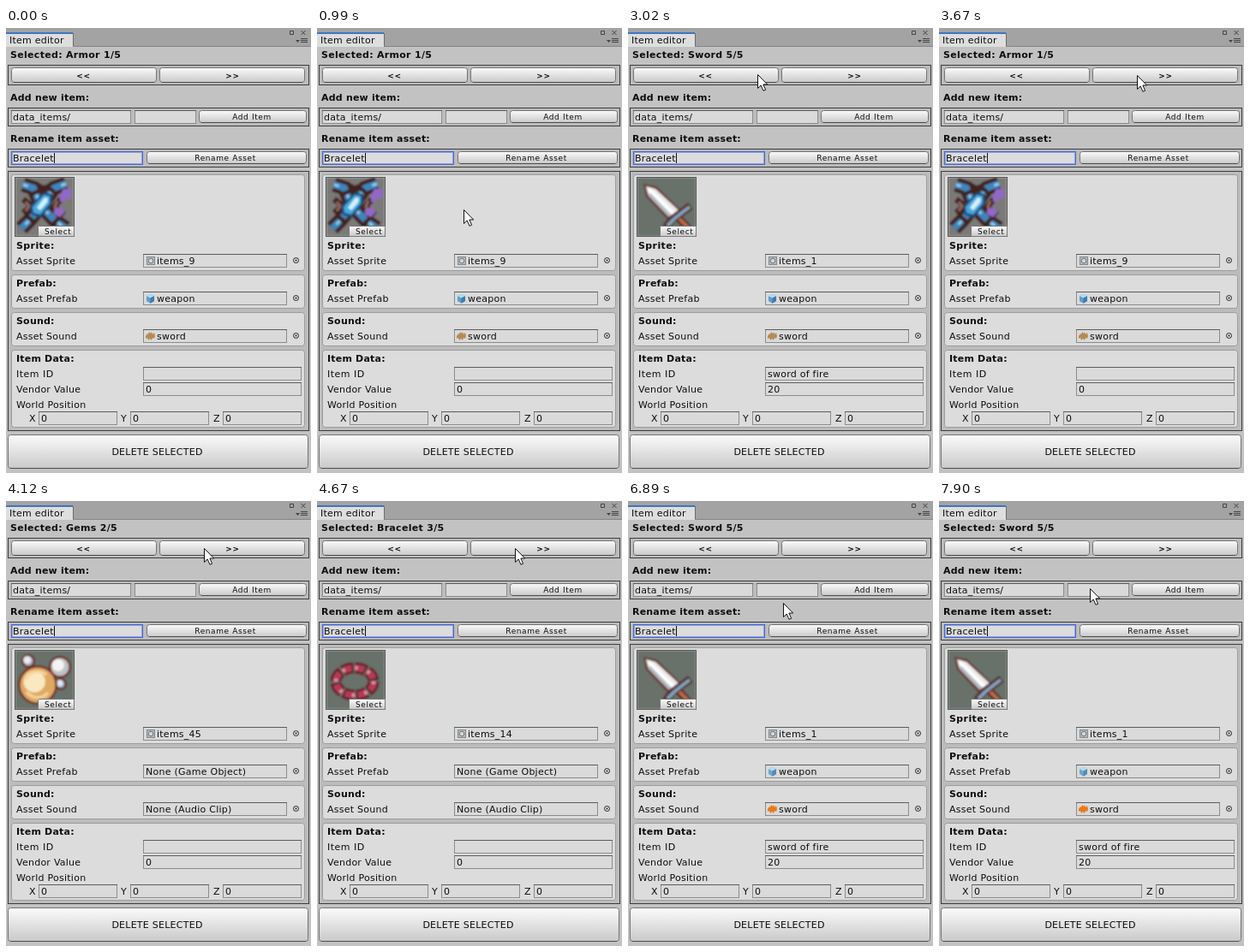
An HTML page that plays this animation: 356x520 px, repeating every 8000 ms.

```html
<!DOCTYPE html>
<html lang="en">
<head>
<meta charset="utf-8">
<title>Item editor</title>
<style>
html, body { margin: 0; width: 100%; height: 100%; overflow: hidden; background: #c2c2c2; }
svg { display: block; width: 100%; height: 100%; }
text { font: 11px "DejaVu Sans", Verdana, sans-serif; fill: #0c0c0c; white-space: pre; }
.b { font-weight: bold; }
.s { font-size: 9px; }
.m { text-anchor: middle; }
</style>
</head>
<body>
<svg id="stage" viewBox="0 0 356 520"></svg>
<script>
const LOOP = 8000;

const items = [
  { name: "Armor 1/5", sprite: "items_9", prefab: "weapon", sound: "sword", id: "", value: "0" },
  { name: "Gems 2/5", sprite: "items_45", prefab: "", sound: "", id: "", value: "0" },
  { name: "Bracelet 3/5", sprite: "items_14", prefab: "", sound: "", id: "", value: "0" },
  { name: "Jar 4/5", sprite: "items_4", prefab: "food", sound: "food", id: "jar of jelly", value: "5" },
  { name: "Sword 5/5", sprite: "items_1", prefab: "weapon", sound: "sword", id: "sword of fire", value: "20" }
];

// time of press, time of release, button, item shown after release
const clicks = [
  [2230, 2340, "prev", 4], [3570, 3670, "next", 0], [4020, 4120, "next", 1],
  [4570, 4670, "next", 2], [5230, 5350, "next", 3], [6100, 6240, "next", 4]
];

// first step, last step, step count, start, bend, end
const moves = [
  [550, 1330, 8, [264, 494], [198, 288], [127, 81]],
  [1450, 1880, 5, [127, 81], [115, 64], [125, 49]],
  [2340, 2670, 4, [125, 49], [130, 50], [136, 53]],
  [3020, 3340, 4, [136, 53], [183, 55], [231, 55]],
  [6570, 7110, 6, [231, 55], [197, 98], [163, 141]],
  [7340, 7900, 6, [163, 141], [156, 118], [176, 102]]
];

const rect = (x, y, w, h, fill, stroke = "none", r = 0, extra = "") =>
  `<rect x="${x + .5}" y="${y + .5}" width="${w - 1}" height="${h - 1}" rx="${r}" fill="${fill}" stroke="${stroke}" ${extra}/>`;
const text = (x, y, s, cls = "", gap = .25, id = "") =>
  `<text x="${x}" y="${y}" class="${cls}" letter-spacing="${gap}" ${id && `id="${id}"`}>${s}</text>`;
const line = (d, color, w = 1, extra = "") =>
  `<path d="${d}" fill="none" stroke="${color}" stroke-width="${w}" ${extra}/>`;
const shape = (d, fill) => `<path d="${d}" fill="${fill}"/>`;
const oval = (x, y, rx, ry, fill, extra = "") =>
  `<ellipse cx="${x}" cy="${y}" rx="${rx}" ry="${ry}" fill="${fill}" ${extra}/>`;

const frame = (y, h) => rect(2, y, 352, h, "#bcbcbc", "#3c3c3c");
const group = (y, h) => rect(6, y, 343, h, "#dcdcdc", "#9c9c9c", 3);
const field = (x, y, w, h = 16) =>
  rect(x, y, w, h, "#dadada", "#8c8c8c") + line(`M${x} ${y + .5}h${w}`, "#5c5c5c");
const button = (x, y, w, h, id = "") =>
  rect(x, y, w, h, "url(#up)", "#747474", 3, id && `id="${id}"`) +
  line(`M${x + 3} ${y + h - .5}h${w - 6}`, "#4c4c4c");
const picker = y =>
  `<circle cx="338.5" cy="${y}" r="3" fill="none" stroke="#222"/><circle cx="338.5" cy="${y}" r="1" fill="#222"/>`;
const assetRow = (y, label, id) =>
  text(12, y + 12, label) + field(160, y, 168) + picker(y + 7.5) + text(176, y + 12, "", "", .25, id);

function armor() {
  const cross = "M10 9L22 13 31 34 48 52 60 60M60 8L46 13 31 34 18 50 8 60";
  return rect(0, 0, 70, 70, "#7a7a78") +
    line(cross, "#43201f", 17) + line("M10 26L20 34 10 42M54 26L46 35 58 44M22 8L34 14 48 8", "#43201f", 7) +
    line(cross, "#3c86bb", 8, 'stroke-dasharray="16 5"') +
    line(cross, "#8fcdee", 3, 'stroke-dasharray="6 15"') +
    line("M13 29L17 34 13 40M50 28L47 35 52 41", "#94685c", 3) +
    shape("M20 44L18 34 34 18 44 20 44 32 30 48z", "#23486e") +
    shape("M22 42L21 35 34 21 41 22 41 31 30 44z", "#45a8e2") +
    shape("M26 36L35 24 39 25 38 30 30 39z", "#d4f0fc") +
    shape("M57 14h9v11h-7v4h-6v-8zM46 38l8-3 5 6-6 6-7-3z", "#9268c6");
}

function gems() {
  const stone = (x, y, r, mid, light) =>
    oval(x, y, r, r, "#6e2c22") + oval(x, y, r - 2.5, r - 2.5, mid) + oval(x - r / 6, y - r / 6, r * .55, r * .55, light);
  return rect(0, 0, 70, 70, "#68716a") +
    stone(16, 13, 8, "#a9b3c4", "#e9eef4") + stone(53, 20, 13, "#bfc3c8", "#f4f4f2") +
    stone(54, 40, 7, "#8da4c4", "#dce8f4") + stone(27, 41, 23, "#dfa865", "#f9e8c0") +
    line("M13 35a15 15 0 0 1 24-6M14 49a16 16 0 0 0 25 1", "#f6d79c", 3);
}

function bracelet() {
  const ring = (color, w, extra = "") => oval(34, 37, 22, 16, "none", `stroke="${color}" stroke-width="${w}" ${extra}`);
  return rect(0, 0, 70, 70, "#68716a") + ring("#5e1a22", 13, 'stroke-dasharray="13 2"') +
    ring("#b23a56", 8, 'stroke-dasharray="11 4"') + ring("#e0a0ae", 4, 'stroke-dasharray="3 12"');
}

function jar() {
  return rect(0, 0, 70, 70, "#68716a") +
    shape("M12 14L18 6 34 2 50 5 58 13 58 34 55 62 46 68H26L14 62 11 40z", "#6e2018") +
    shape("M16 15L22 9 35 6 49 9 54 15 46 21 30 22z", "#f2dfb8") +
    shape("M15 21L31 26 54 20 54 36 51 60 42 65H28L17 59 14 40z", "#b5583c") +
    line("M20 25V34M20 50L25 60M47 26L46 33M30 63H42", "#f0d8a8", 7) +
    shape("M20 36L32 30 45 34 50 45 44 55 31 56 24 48z", "#822618") +
    line("M24 40L34 36 42 42 37 49", "#d99a6c", 4) +
    line("M24 14L35 11 46 14", "#fdf4da", 4);
}

function sword() {
  return rect(0, 0, 70, 70, "#68716a") +
    shape("M8 8L23 11 53 40 40 54 11 23z", "#6a3c34") +
    shape("M11 11L22 14 50 40 41 50 14 22z", "#e9eaea") +
    line("M14 14L44 44", "#ffffff", 4) + line("M15 20L41 47", "#a9b6c2", 3) +
    line("M34 59L42 49 52 42 63 34", "#5b2a22", 9) +
    line("M36 57L44 49 54 41 62 35", "#7ea4c0", 4) +
    line("M49 48L64 64", "#5b2a22", 9) + line("M50 49L62 61", "#b86c4c", 4);
}

const sprites = [armor, gems, bracelet, jar, sword];

function build() {
  const grad = (id, a, b) =>
    `<linearGradient id="${id}" x2="0" y2="1"><stop stop-color="${a}"/><stop offset="1" stop-color="${b}"/></linearGradient>`;
  return `<defs>${grad("up", "#fbfbfb", "#c9c9c9")}${grad("down", "#8a8a8a", "#929292")}
    <filter id="soft" x="0" y="0" width="1" height="1"><feGaussianBlur stdDeviation="1.1"/></filter>
    <clipPath id="thumb"><path d="M0 0h70v70H0z"/></clipPath></defs>` +
    // window chrome
    rect(-1, -1, 358, 522, "#c2c2c2") + shape("M0 0h356v21H0z", "#a3a3a3") +
    line("M0 21.5H356", "#868686") + shape("M0 5h78v17H0z", "#dedede") +
    shape("M0 5h78v2H0z", "#3c76c4") + line("M78.5 6V21", "#6c6c6c") +
    text(4, 18, "Item editor") +
    line("M331.5 3.5h4v4h-4zM344.5 3l5 5M349.5 3l-5 5", "#444") +
    line("M344 12.5h8M344 14.5h8M344 16.5h8", "#444") + shape("M338 14h5l-2.5 3z", "#444") +
    // toolbar
    text(5, 35, "", "b", .3, "title") +
    frame(43, 24) + button(6, 46, 170, 18, "prev") + button(179, 46, 170, 18, "next") +
    text(90.5, 59, "&lt;&lt;", "b s m", .6) + text(264.5, 59, "&gt;&gt;", "b s m", .6) +
    text(5, 85, "Add new item:", "b", .2) +
    frame(93, 22) + field(6, 96, 140) + field(150, 96, 72) + button(225, 96, 126, 15) +
    text(8, 108, "data_items/") + text(287, 107, "Add Item", "s m", .6) +
    text(5, 133, "Rename item asset:", "b", .2) +
    frame(141, 22) + rect(6, 144, 154, 16, "#dcdcdc", "#4866cc") +
    rect(7, 145, 152, 14, "none", "#8ea4e4") + text(8, 156, "Bracelet") +
    line("M56.5 146V158", "#111") +
    button(164, 144, 187, 15) + text(256, 155, "Rename Asset", "s m", .6) +
    // details
    frame(167, 304) + group(171, 113) + group(288, 40) + group(332, 40) + group(376, 91) +
    `<g transform="translate(10 174)" clip-path="url(#thumb)">` +
    sprites.map((draw, i) => `<g id="sprite${i}" filter="url(#soft)">${draw()}</g>`).join("") + `</g>` +
    rect(10, 174, 70, 70, "none", "#565656") +
    rect(37, 231, 43, 13, "url(#up)", "#777", 1) + text(45, 241, "Select", "s", .6) +
    text(12, 258, "Sprite:", "b", .4) + assetRow(264, "Asset Sprite", "sprite") +
    text(12, 302, "Prefab:", "b", .2) + assetRow(308, "Asset Prefab", "prefab") +
    text(12, 346, "Sound:", "b", .2) + assetRow(352, "Asset Sound", "sound") +
    rect(164, 267, 10, 10, "#b4b8ba", "#858a8e") +
    `<circle cx="169" cy="272" r="2.8" fill="#d4d8da" stroke="#70767a"/>` +
    `<g id="cube">${shape("M168.5 311l4.5 2.3v5.8l-4.5 2.7-4.5-2.7v-5.8z", "#5a9fce")}
      ${shape("M168.5 311l4.5 2.3-4.5 2.3-4.5-2.3z", "#b4dcf2")}${shape("M168.5 315.6l4.5-2.3v5.8l-4.5 2.7z", "#3f7cae")}</g>` +
    `<path id="wave" d="M163 360l2-3 1 1 1-3 2 2 1-2 1 3 2-2 1 4-1 3-2-1-1 3-2-2-2 2-1-3-2 1z"/>` +
    text(12, 390, "Item Data:", "b", .2) +
    text(12, 408, "Item ID", "", .5) + field(160, 396, 185) + text(163, 408, "", "", .25, "itemId") +
    text(12, 426, "Vendor Value") + field(160, 414, 185) + text(163, 426, "", "", .25, "value") +
    text(12, 444, "World Position") +
    [["X", 27], ["Y", 134], ["Z", 242]].map(([axis, x]) =>
      text(x, 460, axis) + field(x + 11, 448, 92) + text(x + 14, 460, "0")).join("") +
    button(2, 475, 351, 40) + text(176.5, 499, "DELETE SELECTED", "m") +
    // pointer
    `<circle id="halo" r="12" fill="#f0e41c" fill-opacity=".74"/>
    <path id="cursor" d="M.5 .5V16.5L4.2 13 7 19.3 9.6 18.2 6.9 12H11.7Z" fill="#fff" stroke="#111"/>`;
}

const stage = document.getElementById("stage");
stage.innerHTML = build();
const $ = id => document.getElementById(id);
const show = (id, on) => $(id).setAttribute("display", on ? "inline" : "none");

function pointer(t) {
  const move = moves.filter(m => t >= m[0]).pop();
  if (!move) return null;
  const [start, end, count, a, b, c] = move;
  const step = Math.min(count, Math.floor((t - start + 5) / ((end - start) / (count - 1))) + 1);
  const p = step / count, e = p * p * (3 - 2 * p), q = 1 - e;
  return a.map((v, i) => Math.round(q * q * v + 2 * q * e * b[i] + e * e * c[i]));
}

function setAsset(id, value, none) {
  $(id).textContent = value || `None (${none})`;
  $(id).setAttribute("x", value ? 176 : 163);
}

let shown = "";
function render(t) {
  const done = clicks.filter(c => t >= c[1]).pop();
  const press = clicks.find(c => t >= c[0] && t < c[1]);
  const index = done ? done[3] : 0, item = items[index];
  const fresh = t >= 4120;
  const key = `${index}${fresh}`;

  if (key !== shown) {
    shown = key;
    $("title").textContent = "Selected: " + item.name;
    $("sprite").textContent = item.sprite;
    setAsset("prefab", item.prefab, "Game Object");
    setAsset("sound", item.sound, "Audio Clip");
    $("itemId").textContent = item.id;
    $("value").textContent = item.value;
    show("cube", item.prefab);
    show("wave", item.sound);
    $("wave").setAttribute("fill", fresh ? "#e8791e" : "#b58a55");
    $("cube").setAttribute("opacity", fresh ? .85 : 1);
    sprites.forEach((_, i) => show("sprite" + i, i === index));
  }

  for (const id of ["prev", "next"])
    $(id).setAttribute("fill", `url(#${press && press[2] === id ? "down" : "up"})`);

  const at = pointer(t);
  show("cursor", at);
  show("halo", press);
  if (at) for (const id of ["cursor", "halo"]) $(id).setAttribute("transform", `translate(${at})`);
}

const begin = performance.now();
function tick() {
  render((performance.now() - begin) % LOOP);
  requestAnimationFrame(tick);
}
tick();
</script>
</body>
</html>
```
